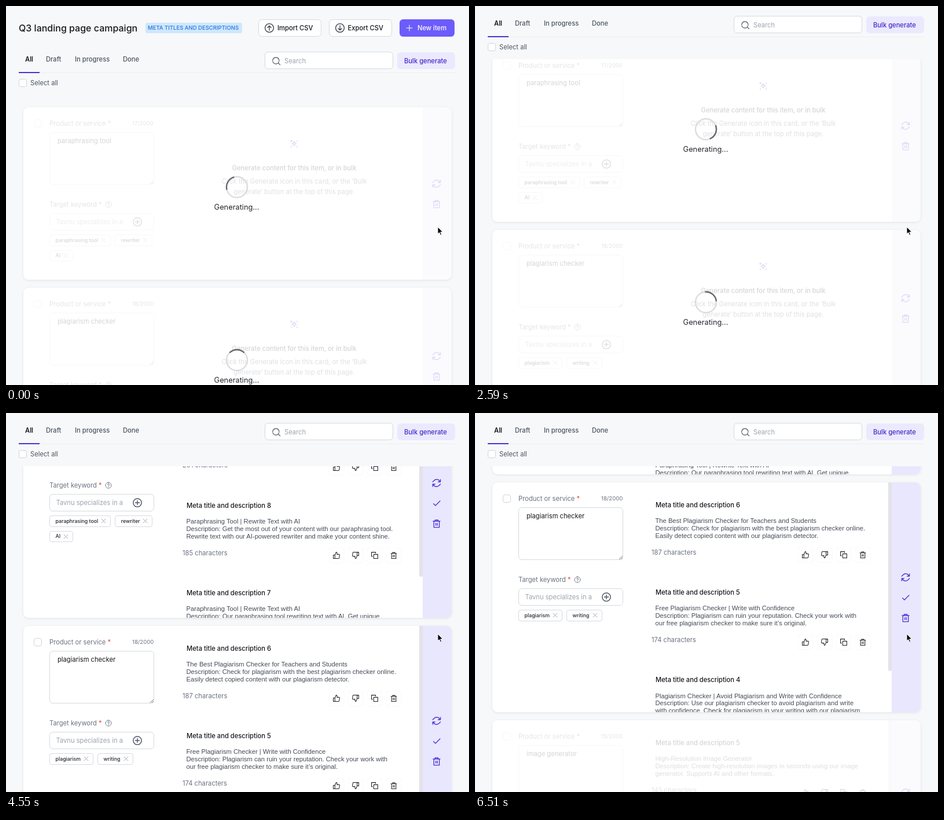
An HTML page for the animation above (6.58 s loop, 800 px wide and 655 px high).

```html
<!DOCTYPE html>
<html lang="en">
<head>
<meta charset="utf-8">
<title>Campaign items</title>
<style>
html, body { margin: 0; width: 100%; height: 100%; overflow: hidden; background: #f7f8fa; }
body { position: relative; font: 11.2px/20px Inter, "Open Sans", sans-serif; color: #4b5563; }
* { box-sizing: border-box; }
svg { display: block; fill: none; stroke: currentColor; stroke-linecap: round; stroke-linejoin: round; }
.t, .box, .ico { position: absolute; white-space: pre; }
.ico { transform: translate(-50%, -50%); }
.mid { transform: translateX(-50%); }
.m { font-weight: 500; }
.dark { color: #16181d; }
.soft { color: #9ca3af; }
.gray { color: #6b7280; }
.red { color: #e5483f; }
.box { border: 1px solid #d6d9de; border-radius: 6px; background: #fff; }
#head { position: absolute; inset: 0 0 auto; height: 154px; background: #f7f8fa; z-index: 2; }
#list { position: absolute; left: 30px; top: 175px; width: 740px; }
.card { position: relative; margin-bottom: 14px; border-radius: 9px; overflow: hidden;
  background: #fff; }
.shade { border-radius: 9px; box-shadow: 0 1px 4px rgba(30, 35, 60, .1); margin-bottom: 14px; }
.shade .card { margin: 0; }
.chips { position: absolute; left: 45px; top: 220px; width: 186px; display: flex; flex-wrap: wrap; gap: 7px; }
.chip { display: flex; align-items: center; height: 19.5px; padding: 0 7px 0 9.5px; border: 1px solid #d6d9de;
  border-radius: 4px; font-size: 8.8px; color: #24272e; }
.chip svg { margin-left: 5px; color: #9ca3af; }
.results { position: absolute; left: 275px; top: 29px; width: 409px; }
.results h3 { margin: 0; padding-left: 7px; font: 500 11.2px/20px Inter, "Open Sans", sans-serif; color: #16181d; }
.results p { margin: 11.3px 0 11.5px; padding-left: 6.5px; white-space: pre;
  font: 11.2px/12.9px "Liberation Sans", Arial, sans-serif; color: #454b58; }
.row { position: relative; height: 20px; margin-bottom: 49.6px; color: #6b7280; }
.act { padding: 6px; border: 1px dotted #ebecef; border-radius: 6px; color: #23262d; }
.bar { position: absolute; left: 684px; top: 0; width: 6px; height: 326px; background: #e3e3e8; border-radius: 0 0 3px 3px; }
.side { position: absolute; right: 0; top: 0; width: 50px; height: 100%; background: #e9e7fd; color: #4a32d4;
  display: flex; flex-direction: column; justify-content: center; align-items: center; gap: 19px; padding-right: 2px; }
.veil { position: absolute; inset: 0; background: rgba(255, 255, 255, .82); color: #24272e; }
.spin { position: absolute; left: 368.5px; top: calc(50% - 11px); }
.veil span { position: absolute; left: 368.5px; top: calc(50% + 14px); font-size: 12.8px; }
#mouse { position: absolute; left: 745px; top: 381px; z-index: 3; }
</style>
</head>
<body>
<div id="head"></div>
<div id="list"></div>
<svg id="mouse" width="11" height="17" viewBox="0 0 11 17"><path d="M1 1v12l2.7-2.5 2 4.6 2-.9-2-4.4h3.8z" fill="#000" stroke="#fff" stroke-width="1"/></svg>
<script>
const LOOP = 6580, STEP = 70, STUCK = 62;

const paths = {
  refresh: 'M22 3v6h-6M2 21v-6h6M21 9A9.3 9.3 0 0 0 5.5 5.5L2 9M3 15a9.3 9.3 0 0 0 15.5 3.5L22 15',
  check: 'M4 13l5 5L21 6',
  trash: 'M3 6h18M8 6V3h8v3M5 6v16h14V6M10 11v6M14 11v6',
  copy: 'M9 9h13v13H9zM5 15H2V2h13v3',
  thumb: 'M7 11l4-9a3 3 0 0 1 3 3v4h6a2 2 0 0 1 2 2.3l-1.4 9a2 2 0 0 1-2 1.7H7zM7 22H2V11h5',
  add: 'M12 2a10 10 0 1 0 .01 0zM12 7v10M7 12h10',
  up: 'M12 1a11 11 0 1 0 .01 0zM12 18V7M7.500 11L12 6.500l4.500 4.500',
  down: 'M12 1a11 11 0 1 0 .01 0zM12 6v11M7.500 13l4.500 4.500 4.500-4.500',
  help: 'M12 2a10 10 0 1 0 .01 0zM9 9.500a3 3 0 1 1 3 3.500v1M12 17v.5',
  find: 'M11 2a9 9 0 1 0 .01 0zM17.500 17.500L23 23',
  plus: 'M12 2v20M2 12h20',
  cross: 'M3 3l18 18M21 3L3 21',
  spark: 'M12 6c1 4 2 5 6 6-4 1-5 2-6 6-1-4-2-5-6-6 4-1 5-2 6-6zM4 2v5M2 4.500h5M20 3v3M4 18v4M20 18v4'
};
const svg = (name, size, width = 2) =>
  `<svg width="${size}" height="${size}" viewBox="0 0 24 24" stroke-width="${width}"><path d="${paths[name]}"/></svg>`;
const ico = (x, y, name, size, color = '#3a3f4a', width = 2) =>
  `<div class="ico" style="left:${x}px;top:${y}px;color:${color}">${svg(name, size, width)}</div>`;
const txt = (x, y, s, cls = '', css = '') =>
  `<div class="t ${cls}" style="left:${x}px;top:${y - 10}px;${css}">${s}</div>`;
const box = (x, y, w, h, css = '') =>
  `<div class="box" style="left:${x}px;top:${y}px;width:${w}px;height:${h}px;${css}"></div>`;
const tick = (x, y) => box(x - 7, y - 7, 14, 14, 'border-radius:3.5px;border-color:#cfd3d9');

document.getElementById('head').innerHTML =
  txt(22, 38, 'Q3 landing page campaign', 'm dark', 'font-size:16px') +
  box(241, 29, 167, 18, 'border:0;border-radius:3px;background:#cfe7fe') +
  txt(245, 38, 'META TITLES AND DESCRIPTIONS', 'm', 'font-size:9.5px;color:#2477d8') +
  box(436, 23, 109, 30) + ico(455, 38, 'up', 16) + txt(469, 38, 'Import CSV', 'm dark') +
  box(558, 23, 109, 30) + ico(576.5, 38, 'down', 16) + txt(590.5, 38, 'Export CSV', 'm dark') +
  box(680, 23, 95, 30, 'border:0;background:#6b5cfb') + ico(697, 38, 'plus', 12, '#fff') +
  txt(711, 38, 'New item', 'm', 'color:#fff') +
  txt(33, 92, 'All', 'dark', 'font-weight:600') + txt(69, 92, 'Draft', 'm') +
  txt(119, 92, 'In progress', 'm') + txt(202, 92, 'Done', 'm') +
  box(22, 115, 754, 1, 'border:0;border-radius:0;background:#eceef2') +
  box(22, 114, 36, 2, 'border:0;border-radius:0;background:#4a32d4') +
  box(447, 79, 222, 30) + ico(466.5, 94.5, 'find', 15, '#555b66') + txt(481, 94.5, 'Search', 'soft') +
  box(676, 80, 100, 28.500, 'border:0;background:#ebe9fe') +
  txt(688, 94.5, 'Bulk generate', '', 'font-weight:550;color:#4526c9') +
  tick(29, 132.5) + txt(42, 133, 'Select all');

// h: loading and finished heights; done/rated: when results and rating buttons show
const cards = [
  { name: 'paraphrasing tool', count: '17/2000', chips: ['paraphrasing tool', 'rewriter', 'AI'],
    h: [298, 397], done: 2940, rated: 3640, turn: [[0, 300], [1610, 855], [LOOP, 2570]],
    items: [
      [9, 201, 'Paraphrasing Tool | Rewrite Articles With AI\nDescription: Our paraphrasing tool rewrite articles with AI to help you\ncreate high-quality content. Try our paraphrasing tool today and see the\ndifference.'],
      [8, 185, 'Paraphrasing Tool | Rewrite Text with AI\nDescription: Get the most out of your content with our paraphrasing tool.\nRewrite text with our AI-powered rewriter and make your content shine.'],
      [7, 180, 'Paraphrasing Tool | Rewrite Text with AI\nDescription: Our paraphrasing tool rewriting text with AI. Get unique,']] },
  { name: 'plagiarism checker', count: '18/2000', chips: ['plagiarism', 'writing'],
    h: [271, 397], done: 3990, rated: 4340, turn: [[0, 0], [1610, 715], [3430, 1467], [LOOP, 2700]],
    items: [
      [6, 187, 'The Best Plagiarism Checker for Teachers and Students\nDescription: Check for plagiarism with the best plagiarism checker online.\nEasily detect copied content with our plagiarism detector.'],
      [5, 174, 'Free Plagiarism Checker | Write with Confidence\nDescription: Plagiarism can ruin your reputation. Check your work with\nour free plagiarism checker to make sure it’s original.'],
      [4, 190, 'Plagiarism Checker | Avoid Plagiarism and Write with Confidence\nDescription: Use our plagiarism checker to avoid plagiarism and write\nwith confidence. Check for plagiarism in your writing with our plagiarism']] },
  { name: 'image generator', count: '15/2000', chips: ['image'],
    h: [319, 319], done: LOOP, rated: 0, preset: true, turn: [[0, 0], [LOOP, 2520]],
    items: [[5, 145, 'High-Resolution Image Generator\nDescription: Create high-resolution images in seconds using our image\ngenerator. Supports AI and other formats.']] }
];

const act = (x, name, cls = '', turn = 0) =>
  `<div class="ico act ${cls}" style="left:${x}px;top:14px"><div style="transform:rotate(${turn}deg)">${svg(name, 13)}</div></div>`;
const result = ([n, chars, text]) =>
  `<h3>Meta title and description ${n}</h3><p>${text}</p><div class="row">${chars} characters` +
  act(266, 'thumb', 'rate') + act(299, 'thumb', 'rate', 180) + act(332, 'copy') + act(365, 'trash') + '</div>';
const chip = s => `<div class="chip m">${s}${svg('cross', 9, 2.5)}</div>`;

const cardHtml = c => `<div class="shade"><div class="card">` +
  tick(25, 28) + txt(45, 28, 'Product or service <span class="red">*</span>', 'gray') +
  txt(188, 28, c.count, 'gray', 'font-size:9.6px') +
  box(45, 43, 181, 91) + txt(59, 58, c.name, 'dark') + 
  `<svg class="t" style="left:219px;top:127px" width="6" height="6" stroke-width=".8"><path d="M0 6L6 0M3 6L6 3"/></svg>` +
  txt(45, 168, 'Target keyword <span class="red">*</span>', 'gray') + ico(147, 168, 'help', 12, '#6b7280') +
  box(45, 183, 181, 30) + txt(56.5, 198, 'Tavnu specializes in a', 'soft') + ico(197, 198, 'add', 17, '#4b5563') +
  `<div class="chips">${c.chips.map(chip).join('')}</div>` +
  `<div class="empty">` + ico(468, 63, 'spark', 15, '#4a32d4') +
  txt(468, 105, 'Generate content for this item, or in bulk', 'm dark mid') +
  txt(468, 128, 'Click the Generate icon in this card, or the ‘Bulk', 'mid') +
  txt(468, 145.5, 'generate’ button at the top of this page.', 'mid') + '</div>' +
  `<div class="full"><div class="results">${c.items.map(result).join('')}</div><div class="bar"></div></div>` +
  `<div class="side">${svg('refresh', 16)}<div class="full">${svg('check', 16)}</div>${svg('trash', 16)}</div>` +
  `<div class="veil"><svg class="spin ico" width="40" height="40" stroke-width="2.4">
    <circle cx="20" cy="20" r="18" stroke="#dcdcde"/>
    <circle class="arc" cx="20" cy="20" r="18" stroke="#68686c" stroke-linecap="butt" pathLength="360" stroke-dasharray="90 270"/></svg>
    <span class="mid">Generating...</span></div></div></div>`;

const list = document.getElementById('list');
const head = document.getElementById('head');
list.innerHTML = cards.map(cardHtml).join('');
cards.forEach((c, i) => {
  const el = list.children[i].firstChild, all = s => [...el.querySelectorAll(s)];
  Object.assign(c, { el, empty: all('.empty'), full: all('.full'), rate: all('.rate'), veil: all('.veil'), arc: all('.arc')[0] });
});
const show = (els, on) => els.forEach(e => e.style.display = on ? '' : 'none');

const scroll = [[0, 0], [1050, 0], [1400, 21], [1610, 41], [3430, 146], [4550, 218], [5250, 260], [6090, 365], [6510, 466]];

function segment(pts, t) {
  let i = 0;
  while (i < pts.length - 2 && t >= pts[i + 1][0]) i++;
  return i;
}
function linear(pts, t) {
  const i = segment(pts, t), [a, b] = [pts[i], pts[i + 1]];
  return a[1] + (b[1] - a[1]) * (t - a[0]) / (b[0] - a[0]);
}
// Monotone cubic through the points
function smooth(pts, t) {
  const rate = i => (pts[i + 1][1] - pts[i][1]) / (pts[i + 1][0] - pts[i][0]);
  const slope = i => {
    if (i === 0) return rate(0);
    if (i === pts.length - 1) return rate(i - 1);
    const a = rate(i - 1), b = rate(i);
    return a * b > 0 ? 2 * a * b / (a + b) : 0;
  };
  const i = segment(pts, t), [t0, y0] = pts[i], [t1, y1] = pts[i + 1];
  const d = t1 - t0, u = (t - t0) / d, v = 1 - u;
  return y0 * (1 + 2 * u) * v * v + y1 * u * u * (3 - 2 * u) + d * u * v * (slope(i) * v - slope(i + 1) * u);
}

function draw(t) {
  const y = Math.round(smooth(scroll, t));
  head.style.transform = `translateY(${-Math.min(y, STUCK)}px)`;
  list.style.transform = `translateY(${-y}px)`;
  for (const c of cards) {
    const done = t >= c.done, filled = done || c.preset;
    c.el.style.height = c.h[+done] + 'px';
    show(c.empty, !filled);
    show(c.full, filled);
    show(c.rate, t >= c.rated);
    show(c.veil, !done);
    c.arc.setAttribute('transform', `rotate(${linear(c.turn, t) - 135} 20 20)`);
  }
}

const start = performance.now();
function tickFrame() {
  const t = (performance.now() - start) % LOOP;
  draw(Math.floor(t / STEP) * STEP);
  requestAnimationFrame(tickFrame);
}
tickFrame();
</script>
</body>
</html>
```
